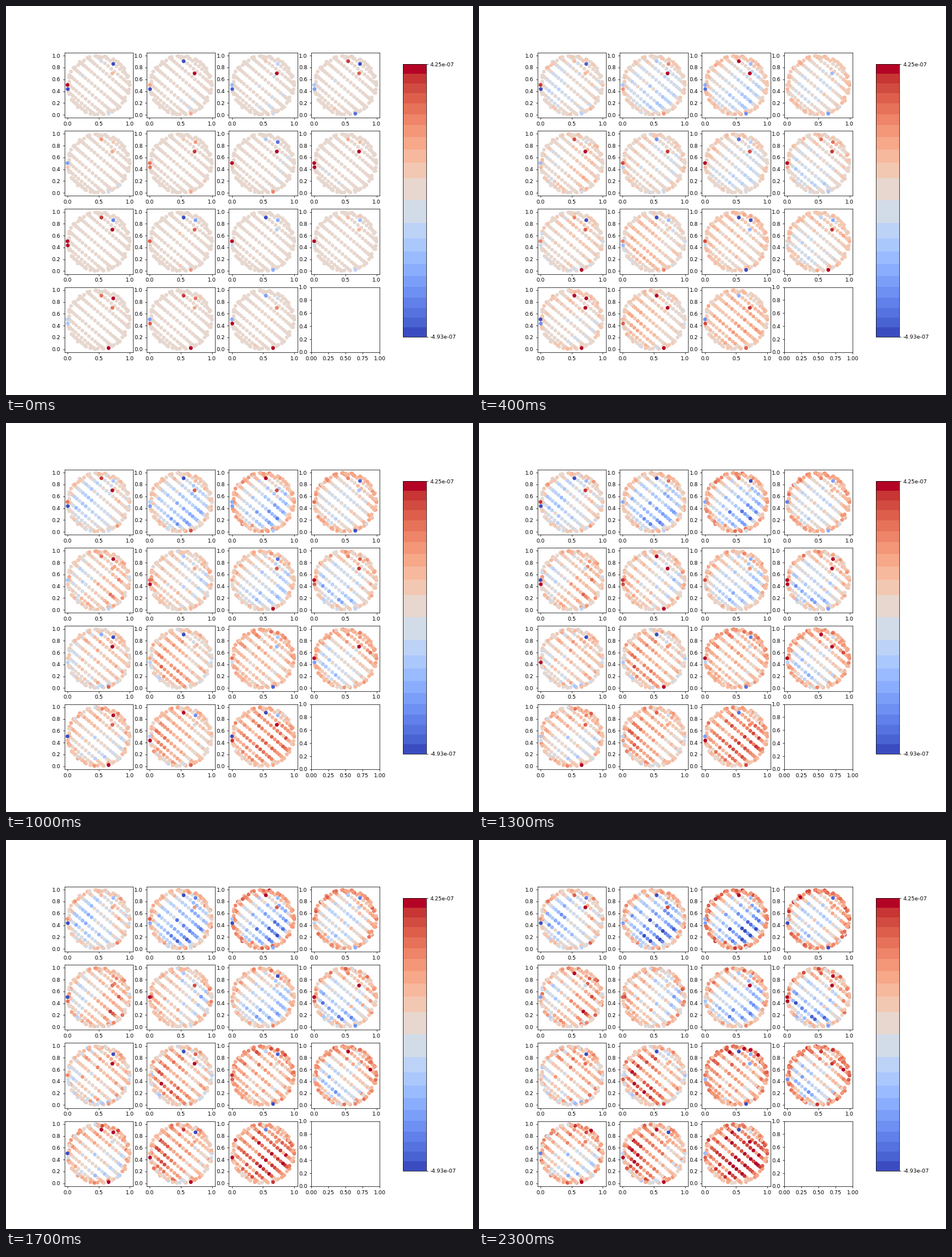
Animation of 820 by 683 pixels, one loop 2.4 s. Source, as a matplotlib script:

```python
import numpy as np
import matplotlib.pyplot as plt
from matplotlib.animation import FuncAnimation
from matplotlib.colors import ListedColormap, Normalize

# 12 in wide at this dpi gives a stage of 820 x 683 pixels
SIZE, DPI = (12, 9.9953), 820 / 12
FRAMES, STEP_MS, PANELS = 24, 100, 15
VMIN, VMAX = -4.93, 4.25  # in units of 1e-7
HOT = np.array([(0.545, 0.905), (0.735, 0.86), (0.72, 0.70),
                (0, 0.505), (0.005, 0.435), (0.66, 0.02)])  # restless points


def sphere_points(rings=11):
    """Tilted latitude rings seen edge-on, plus a loose outline."""
    step, tilt = np.pi / rings, np.radians(42)
    pts = []
    for lat in np.radians(-87.7) + step * np.arange(rings):
        n = max(1, round(2 * np.pi * np.cos(lat) / step))
        phase = 0 if n % 2 else np.pi / 2 / n
        along = np.cos(lat) * np.sin(phase + 2 * np.pi * np.arange(n) / n)
        off = np.sin(lat)
        pts.append(np.c_[along * np.cos(tilt) + off * np.sin(tilt),
                         off * np.cos(tilt) - along * np.sin(tilt)])
    k = np.arange(40)
    a = 2 * np.pi * (k + 0.3 * np.sin(5 * k)) / len(k)
    r = 0.97 + 0.03 * np.cos(7 * a)
    pts.append(np.c_[r * np.cos(a), r * np.sin(a)])
    pts = 0.5 + 0.5 * np.vstack(pts)
    gap = np.linalg.norm(pts[:, None] - HOT, axis=2).min(1)
    return pts[gap > 0.03]


def banded_cmap(bands=22):
    """Coolwarm in flat bands that widen towards the middle."""
    u = np.linspace(-1, 1, bands + 1)
    edges = 0.5 + 0.5 * np.sign(u) * np.abs(u) ** 0.75
    mid = (edges[1:] + edges[:-1]) / 2
    mid[0], mid[-1] = 0, 1
    band = np.digitize(np.linspace(0, 1, 480), edges[1:-1])
    return ListedColormap(plt.get_cmap("coolwarm")(mid[band]))


BODY = sphere_points()
POINTS = np.vstack([BODY, HOT])
X, Y = (2 * BODY - 1).T
RIM = 1 / (1 + np.exp(-30 * (np.hypot(X, Y) - 0.84)))


def wave(i, peak, period):
    return np.cos(2 * np.pi * (i - peak) / period)


def field(i):
    """Final pattern of panel i: a rim and a sloping inner plane."""
    rim = 1.2 + 0.6 * wave(i, 2.4, 4) + 0.5 * wave(i, 2.5, 9) + 0.4 * Y
    swing = wave(i, 4, 5)
    inner = 0.2 * i - 1.3 + 1.3 * swing
    inner = inner + 2 * wave(i, 3.6, 3.7) * X + (0.6 - 1.6 * swing) * Y
    return RIM * rim + (1 - RIM) * 1.15 * inner


def values(i, frame):
    fixed = np.random.default_rng(i + 1)
    body = field(i) + fixed.normal(0, 0.9, len(BODY))
    hot = fixed.normal(0, 3, len(HOT))
    rng = np.random.default_rng([i, frame])
    grow = 0.06 + 0.94 * (frame / (FRAMES - 1)) ** 0.65
    return np.r_[grow * body + rng.normal(0, 0.12, len(BODY)),
                 hot + rng.normal(0, 2, len(HOT))]


fig, axes = plt.subplots(4, 4, figsize=SIZE, dpi=DPI)
fig.subplots_adjust(left=0.125, right=0.8, bottom=0.11, top=0.88,
                    wspace=0.2, hspace=0.2)
cmap, norm = banded_cmap(), Normalize(VMIN, VMAX)

dots = []
for i, ax in enumerate(axes.flat[:PANELS]):
    dots.append(ax.scatter(*POINTS.T, c=values(i, 0), cmap=cmap, norm=norm))
    ax.set(xlim=(-0.05, 1.05), ylim=(-0.05, 1.05),
           xticks=np.arange(3) / 2, yticks=np.arange(6) / 5)
axes[3, 3].set(xticks=np.arange(5) / 4, yticks=np.arange(6) / 5)

bar = fig.colorbar(dots[0], cax=fig.add_axes([0.85, 0.15, 0.05, 0.7]))
bar.set_ticks([VMIN, VMAX], labels=[f"{v * 1e-7:.2e}" for v in (VMIN, VMAX)])


def update(frame):
    for i, dot in enumerate(dots):
        dot.set_array(values(i, frame))
    return dots


anim = FuncAnimation(fig, update, frames=FRAMES, interval=STEP_MS,
                     repeat=True, repeat_delay=0, blit=False)
plt.show()
```
